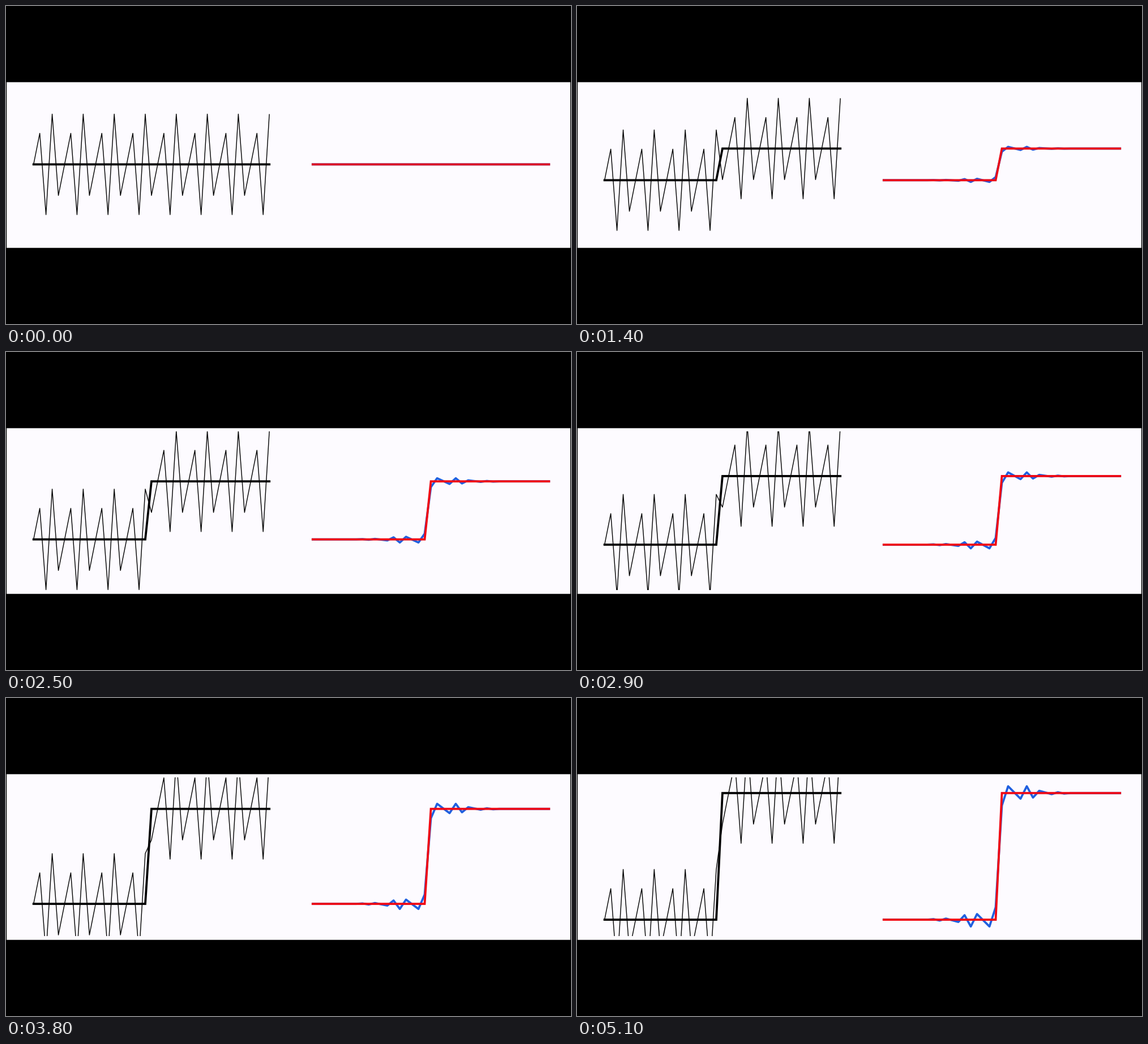
A matplotlib script for the animation above (5.3 s loop, 998x561 px).

```python
import numpy as np
import matplotlib.pyplot as plt
from matplotlib.animation import FuncAnimation
from matplotlib.patches import Rectangle

W, H, DPI = 998, 561, 64
PX = 72 / DPI               # one pixel in points
MID = 279.4                 # resting height of both traces
N, EDGE = 39, 19            # samples, first sample after the step
FRAMES, INTERVAL = 53, 100
STEPS, RISE = 24, 111.7     # growth steps and final half height

n = np.arange(N)
x_left = 48.7 + 10.96 * n
x_right = 541.8 + 10.985 * n
side = np.where(n < EDGE, -1, 1)
noise = 93.3 * np.sin(2 * np.pi * 2 * n / 5)

# Ringing after the step, relative to its half height; mirrored before it
tail = np.array([-22, 12, 1, -10, 12, -8, 4, 1, -2, 1.5, -1]) / RISE
ripple = np.zeros(N)
ripple[EDGE:EDGE + len(tail)] = tail
ripple[EDGE - len(tail):EDGE] = -tail[::-1]

fig = plt.figure(figsize=(W / DPI, H / DPI), dpi=DPI, facecolor="black")
ax = fig.add_axes([0, 0, 1, 1])
ax.set_xlim(0, W)
ax.set_ylim(H, 0)
ax.axis("off")
ax.add_patch(Rectangle((1.2, 134.4), 995.6, 292.3, fc="#fdfbff", lw=0,
                       snap=False))


def trace(xs, color, width, join="miter", cap="projecting"):
    line, = ax.plot(xs, np.full(N, MID), color=color, lw=width * PX,
                    solid_joinstyle=join, solid_capstyle=cap, snap=False)
    return line


window = Rectangle((40, 140), 435, 280, fc="none", ec="none")
ax.add_patch(window)
wave = trace(x_left, "#080808", 1.45, "round", "butt")
wave.set_clip_path(window)
step = trace(x_left, "black", 3.8)
smooth = trace(x_right, "#2060e0", 3.8, "round")
ideal = trace(x_right, "#f00a18", 3.8)


def mix(a, b, t):
    return tuple((np.array(a) + (np.array(b) - a) * t) / 255)


def update(i):
    k = min(max((i - 2) // 2, 0), STEPS)
    half = RISE * k / STEPS
    level = MID - half * side
    wave.set_ydata(level - noise)
    step.set_ydata(level)
    ideal.set_ydata(level)
    smooth.set_ydata(level - half * ripple)
    t = min(k / 8, 1)
    ideal.set_color(mix((220, 20, 38), (240, 8, 20), t))
    smooth.set_color(mix((70, 75, 195), (32, 96, 224), t))
    return wave, step, smooth, ideal


anim = FuncAnimation(fig, update, frames=FRAMES, interval=INTERVAL,
                     repeat=True, repeat_delay=0, blit=False)
plt.show()
```
